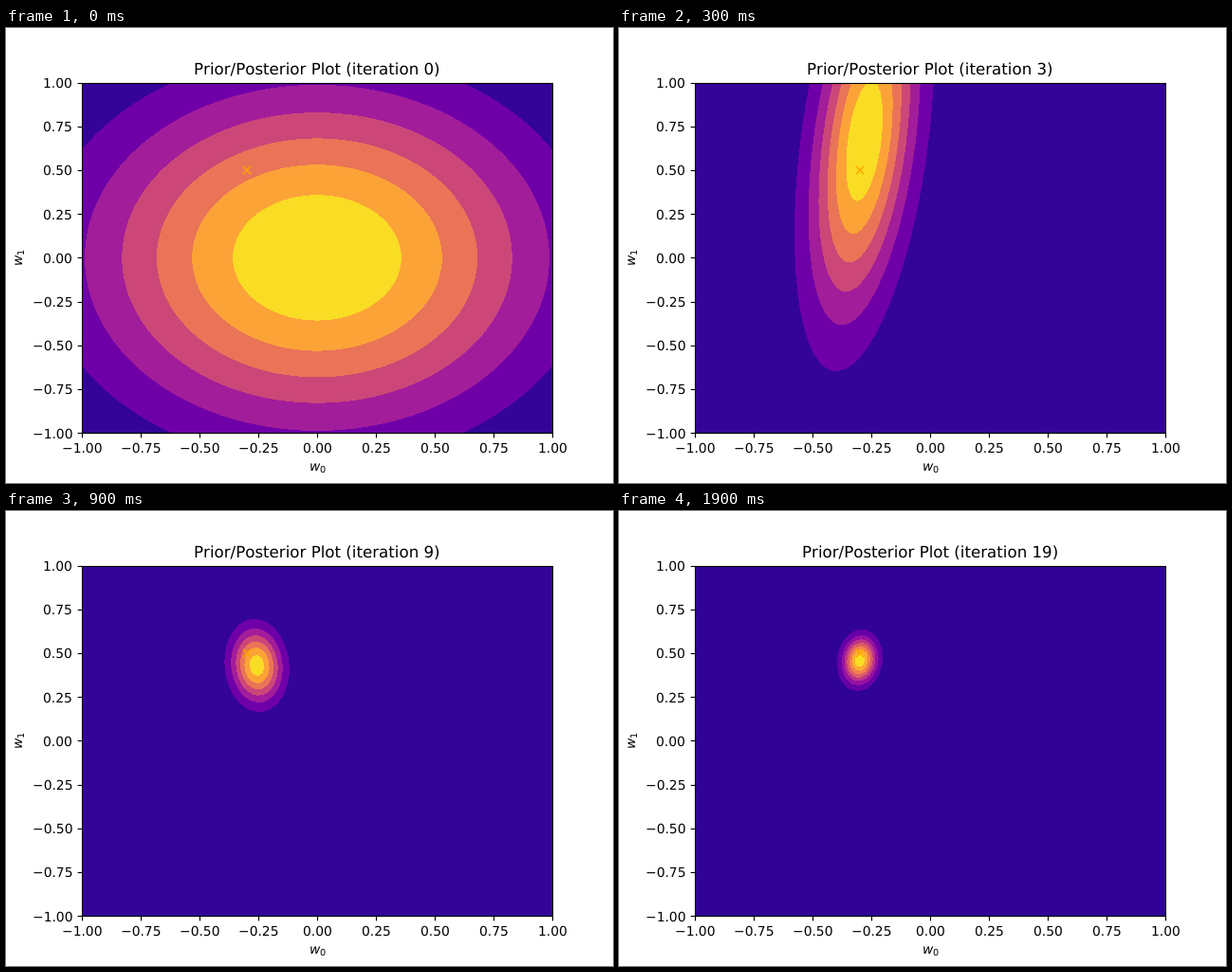
Write an HTML page with a canvas that moves like this. It is 640 px wide and 480 px high and loops after 2 s.

```html
<!DOCTYPE html>
<html lang="en">
<head>
<meta charset="utf-8">
<title>Prior/Posterior Plot</title>
<style>
html, body { margin: 0; width: 100%; height: 100%; overflow: hidden; background: #fff; }
canvas { display: block; width: 640px; height: 480px; }
</style>
</head>
<body>
<canvas id="plot" width="640" height="480"></canvas>
<script>
const ctx = document.getElementById('plot').getContext('2d');
const LEFT = 80, TOP = 57.6, WIDTH = 496, HEIGHT = 369.6;
const STEP_MS = 100, COUNT = 20, GRID = 100;
const ALPHA = 2, BETA = 25;
const FONT = '"DejaVu Sans", sans-serif';
const POINT = 100 / 72;

const PALETTES = {
  7: ['#340498', '#6f00a8', '#a21d9a', '#cc4778', '#ea7457', '#fca338', '#f9dc24'],
  8: ['#300396', '#6600a7', '#9511a1', '#bb3488', '#db5c68', '#f1814d', '#fdac33', '#f8df25']
};

// Sample inputs of the regression; each one sharpens the posterior.
const inputs = [-.03, -.16, .94, -.55, .6, -.55, .35, -.29, .85, -.75,
  .75, -.5, -.7, -.35, .2, -.55, .2, -.4];

// Posterior mean at every iteration.
const means = [
  [0, 0], [-.338, .012], [-.338, .035], [-.279, .667], [-.225, .56],
  [-.1925, .387], [-.21, .365], [-.225, .39], [-.242, .41], [-.256, .43],
  [-.27, .46], [-.285, .49], [-.297, .51], [-.307, .528], [-.305, .52],
  [-.303, .505], [-.302, .49], [-.3, .475], [-.298, .467], [-.2985, .46]
];

const toX = w => LEFT + (w + 1) / 2 * WIDTH;
const toY = w => TOP + (1 - w) / 2 * HEIGHT;
const snap = v => Math.round(v) + .5;
const clamp = (v, lo, hi) => Math.min(hi, Math.max(lo, v));

// The plotted covariance lags one sample behind the mean.
function density(iteration) {
  const [mx, my] = means[iteration];
  let a = ALPHA, b = 0, c = ALPHA;
  for (const x of inputs.slice(0, Math.max(0, iteration - 1))) {
    a += BETA;
    b += BETA * x;
    c += BETA * x * x;
  }
  const peak = Math.sqrt(a * c - b * b) / (2 * Math.PI);
  return (x, y) => {
    const u = x - mx, v = y - my;
    return peak * Math.exp(-(a * u * u + 2 * b * u * v + c * v * v) / 2);
  };
}

function niceStep(range) {
  const raw = range / 8;
  const scale = 10 ** Math.floor(Math.log10(raw));
  return scale * [1, 1.5, 2, 2.5, 3, 4, 5, 6, 8, 10].find(s => s * scale >= raw);
}

function sampleGrid(f) {
  const z = new Float64Array(GRID * GRID);
  const at = i => -1 + 2 * i / (GRID - 1);
  for (let j = 0; j < GRID; j++)
    for (let i = 0; i < GRID; i++) z[j * GRID + i] = f(at(i), at(j));
  return z;
}

function bandColors(count) {
  const list = PALETTES[clamp(count, 7, 8)];
  return list.map(h => [1, 3, 5].map(k => parseInt(h.slice(k, k + 2), 16)));
}

function drawContours(iteration) {
  const z = sampleGrid(density(iteration));
  let min = Infinity, max = 0;
  for (const v of z) {
    min = Math.min(min, v);
    max = Math.max(max, v);
  }
  const step = niceStep(max - min);
  const low = Math.floor(min / step);
  const colors = bandColors(Math.ceil(max / step) - low);
  const w = 496, h = 369, x0 = 80, y0 = 58;
  const image = ctx.createImageData(w, h);
  const cell = GRID - 1;
  for (let py = 0, p = 0; py < h; py++) {
    const gy = clamp((1 - (y0 + py + .5 - TOP) / HEIGHT) * cell, 0, cell - 1e-6);
    const j = Math.floor(gy), v = gy - j;
    for (let px = 0; px < w; px++, p += 4) {
      const gx = clamp((x0 + px + .5 - LEFT) / WIDTH * cell, 0, cell - 1e-6);
      const i = Math.floor(gx), u = gx - i, k = j * GRID + i;
      const value = (z[k] * (1 - u) + z[k + 1] * u) * (1 - v)
        + (z[k + GRID] * (1 - u) + z[k + GRID + 1] * u) * v;
      const band = clamp(Math.floor(value / step) - low, 0, colors.length - 1);
      image.data.set(colors[band], p);
      image.data[p + 3] = 255;
    }
  }
  ctx.putImageData(image, x0, y0);
}

function line(x1, y1, x2, y2) {
  ctx.beginPath();
  ctx.moveTo(x1, y1);
  ctx.lineTo(x2, y2);
  ctx.stroke();
}

function setFont(points, style = '') {
  ctx.font = `${style} ${points * POINT}px ${FONT}`;
  ctx.fontKerning = 'none';
  ctx.textRendering = 'geometricPrecision';
}

// Aligns by advance width, then puts the first glyph's ink on a whole pixel.
function text(str, x, y, points, align) {
  setFont(points);
  const box = ctx.measureText(str);
  const bearing = -box.actualBoundingBoxLeft;
  const left = Math.round(x - box.width * align + bearing) - Math.floor(bearing);
  ctx.fillText(str, left, Math.round(y));
}

function drawMarker() {
  const x = Math.round(toX(-.3)), y = Math.round(toY(.5)), r = 3 * POINT;
  ctx.strokeStyle = '#ffa500';
  ctx.lineWidth = POINT;
  line(x - r, y - r, x + r, y + r);
  line(x - r, y + r, x + r, y - r);
}

function weightLabel(sub, x, y, angle) {
  ctx.save();
  ctx.translate(x, y);
  ctx.rotate(angle);
  setFont(10, 'italic');
  ctx.fillText('w', 0, 0);
  setFont(7);
  ctx.fillText(sub, 11, 2);
  ctx.restore();
}

function drawAxes() {
  ctx.strokeStyle = ctx.fillStyle = '#000';
  ctx.lineWidth = .8 * POINT;
  ctx.strokeRect(80.5, 58.5, 496, 369);
  for (let i = 0; i <= 8; i++) {
    const value = -1 + i / 4;
    const label = (value < 0 ? '\u2212' : '') + Math.abs(value).toFixed(2);
    const x = toX(value), y = toY(value);
    line(snap(x), 427.5, snap(x), 432.4);
    line(75.6, snap(y), 80.5, snap(y));
    text(label, x, 448, 10, .5);
    text(label, 70.28, y + 5.4, 10, 1);
  }
  weightLabel('0', 320, 467, 0);
  weightLabel('1', 17, 251, -Math.PI / 2);
}

function draw(iteration) {
  ctx.fillStyle = '#fff';
  ctx.fillRect(0, 0, 640, 480);
  drawContours(iteration);
  drawMarker();
  drawAxes();
  text(`Prior/Posterior Plot (iteration ${iteration})`, 328, 49, 12, .5);
}

let shown = -1;
const start = performance.now();

function tick() {
  const elapsed = Math.max(0, performance.now() - start);
  const iteration = Math.floor(elapsed / STEP_MS) % COUNT;
  if (iteration !== shown) {
    shown = iteration;
    draw(iteration);
  }
  requestAnimationFrame(tick);
}
tick();
</script>
</body>
</html>
```
